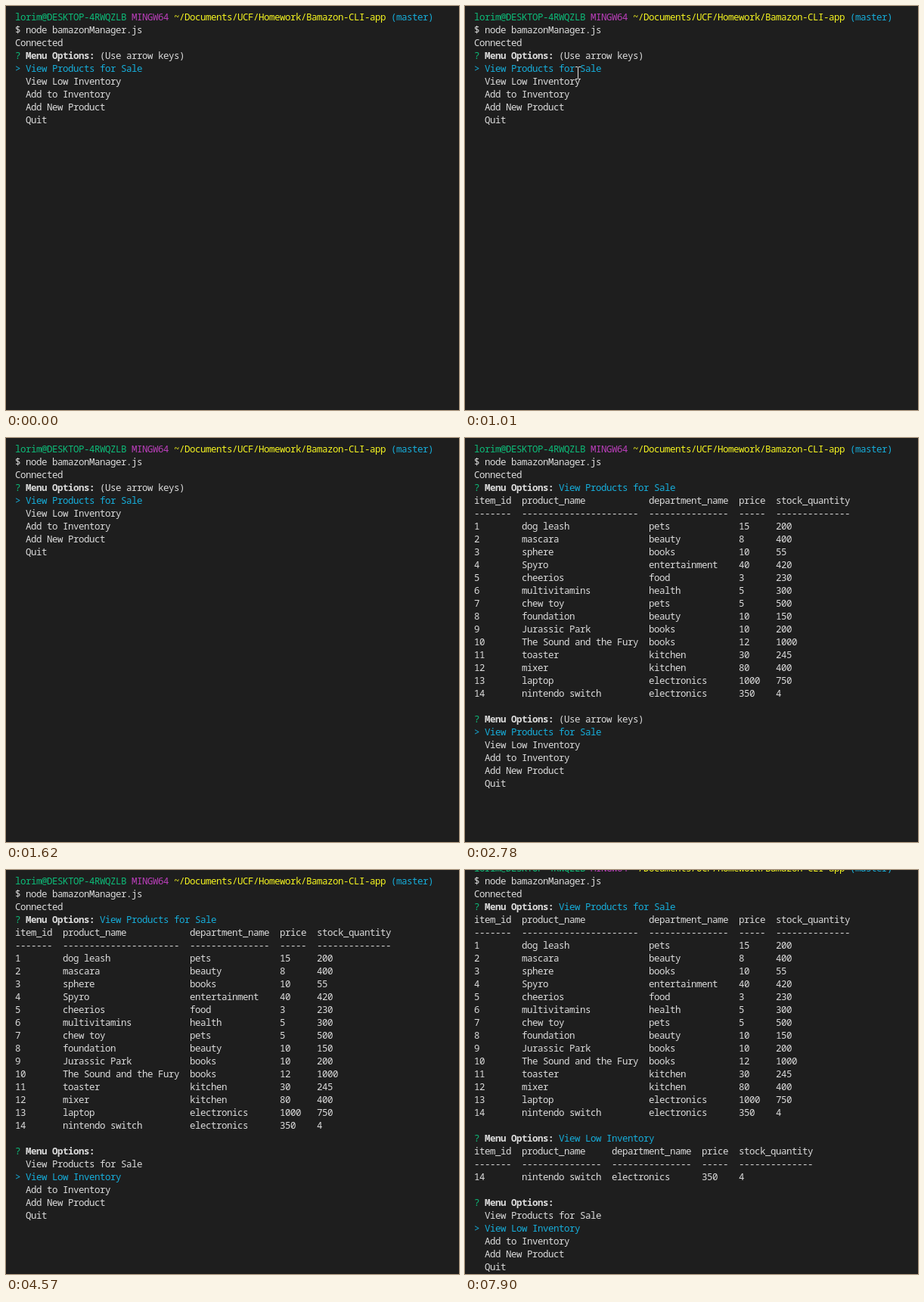
An HTML page that plays this animation: 599x534 px, repeating every 8000 ms.

```html
<!DOCTYPE html>
<html lang="en">
<head>
<meta charset="utf-8">
<title>Store manager terminal</title>
<style>
  html, body { margin: 0; width: 100%; height: 100%; overflow: hidden; background: #1e1e1e; }
  #stage { position: relative; width: 599px; height: 534px; overflow: hidden; }
  #screens { position: absolute; left: 0; top: 0; animation: screens 8s step-end infinite; }
  .screen { position: relative; width: 599px; height: 534px; overflow: hidden; }
  /* Terminal grid: every character sits in a 7 by 17 pixel cell. */
  pre {
    position: absolute; left: 12px; top: 6px; margin: 0;
    font: 500 12.5px/17px "Noto Sans Mono", "DejaVu Sans Mono", monospace;
    letter-spacing: calc(7px - 1ch);
    font-variant-ligatures: none;
    color: #dcdcdc;
  }
  .scrolled pre { top: -11px; }
  b { font-weight: 700; }
  .green { color: #0dbc79; }
  .magenta { color: #bc3fbc; }
  .yellow { color: #f5f520; }
  .cyan { color: #16aedb; }
  .block { display: inline-block; width: 7px; height: 17px; vertical-align: top; background: #ccc; }
  #pointer { position: absolute; visibility: hidden; animation: pointer 8s step-end infinite; }

  @keyframes screens {
    0%      { top: 0; }
    33.75%  { top: -534px; }
    34.75%  { top: -1068px; }
    57.125% { top: -1602px; }
    66.875% { top: -2136px; }
    98.75%, 100% { top: -2670px; }
  }
  @keyframes pointer {
    0%      { visibility: hidden; }
    0.875%  { visibility: visible; left: 329px; top: 322px; }
    1.875%  { visibility: visible; left: 268px; top: 226px; }
    2.875%  { visibility: visible; left: 214px; top: 140px; }
    3.75%   { visibility: visible; left: 178px; top: 84px; }
    4.75%   { visibility: visible; left: 162px; top: 60px; }
    5.75%   { visibility: visible; left: 158px; top: 56px; }
    6.625%  { visibility: visible; left: 154px; top: 68px; }
    7.625%  { visibility: visible; left: 151px; top: 82px; }
    10.5%   { visibility: visible; left: 136px; top: 76px; }
    12.625% { visibility: visible; left: 146px; top: 80px; }
    13.5%   { visibility: visible; left: 150px; top: 81px; }
    14.5%   { visibility: visible; left: 172px; top: 86px; }
    15.375% { visibility: visible; left: 216px; top: 96px; }
    16.375% { visibility: visible; left: 286px; top: 112px; }
    17.375% { visibility: visible; left: 376px; top: 132px; }
    18.25%  { visibility: visible; left: 474px; top: 152px; }
    19.25%  { visibility: visible; left: 579px; top: 169px; }
    20.25%, 100% { visibility: hidden; }
  }
</style>
</head>
<body>
<div id="stage">
  <div id="screens"></div>
  <svg id="pointer" width="7" height="17" viewBox="0 0 7 17" fill="none" stroke="#e1e1e1">
    <path d="M0 .5h3m1 0h3M3.5 1v15M0 16.5h3m1 0h3"/>
  </svg>
</div>
<script>
  const OPTIONS = ['View Products for Sale', 'View Low Inventory', 'Add to Inventory', 'Add New Product', 'Quit'];
  const COLUMNS = ['item_id', 'product_name', 'department_name', 'price', 'stock_quantity'];
  const PRODUCTS = `dog leash,pets,15,200
mascara,beauty,8,400
sphere,books,10,55
Spyro,entertainment,40,420
cheerios,food,3,230
multivitamins,health,5,300
chew toy,pets,5,500
foundation,beauty,10,150
Jurassic Park,books,10,200
The Sound and the Fury,books,12,1000
toaster,kitchen,30,245
mixer,kitchen,80,400
laptop,electronics,1000,750
nintendo switch,electronics,350,4`
    .split('\n').map((line, i) => [String(i + 1), ...line.split(',')]);

  const paint = (color, text) => `<span class="${color}">${text}</span>`;

  const question = text => `${paint('green', '?')} <b>Menu Options:</b> ${text}\n`;

  const answer = index => question(paint('cyan', OPTIONS[index]));

  const menu = (selected, hint = '') => question(hint) + OPTIONS.map((option, i) =>
    i === selected ? paint('cyan', '&gt; ' + option) : '  ' + option).join('\n');

  function table(rows) {
    const widths = COLUMNS.map((name, c) => Math.max(name.length, ...rows.map(row => row[c].length)));
    const dashes = widths.map(width => '-'.repeat(width));
    return [COLUMNS, dashes, ...rows].map(row =>
      row.map((cell, c) => cell.padEnd(widths[c])).join('  ')).join('\n') + '\n\n';
  }

  const HINT = '(Use arrow keys)';
  const prompt = [
    paint('green', 'lorim@DESKTOP-4RWQZLB'),
    paint('magenta', 'MINGW64'),
    paint('yellow', '~/Documents/UCF/Homework/Bamazon-CLI-app'),
    paint('cyan', '(master)')
  ].join(' ');
  const start = prompt + '\n$ node bamazonManager.js\nConnected\n';
  const listing = start + answer(0) + table(PRODUCTS);
  const lowStock = listing + answer(1) + table(PRODUCTS.slice(-1));

  const screen = (content, scrolled = '') => `<div class="screen ${scrolled}"><pre>${content}</pre></div>`;

  document.getElementById('screens').innerHTML = [
    screen(start + menu(0, HINT)),
    screen(start + answer(0) + '<span class="block"></span>'),
    screen(listing + menu(0, HINT)),
    screen(listing + menu(1)),
    screen(lowStock + menu(0, HINT), 'scrolled'),
    screen(lowStock + menu(1), 'scrolled')
  ].join('');
</script>
</body>
</html>
```
